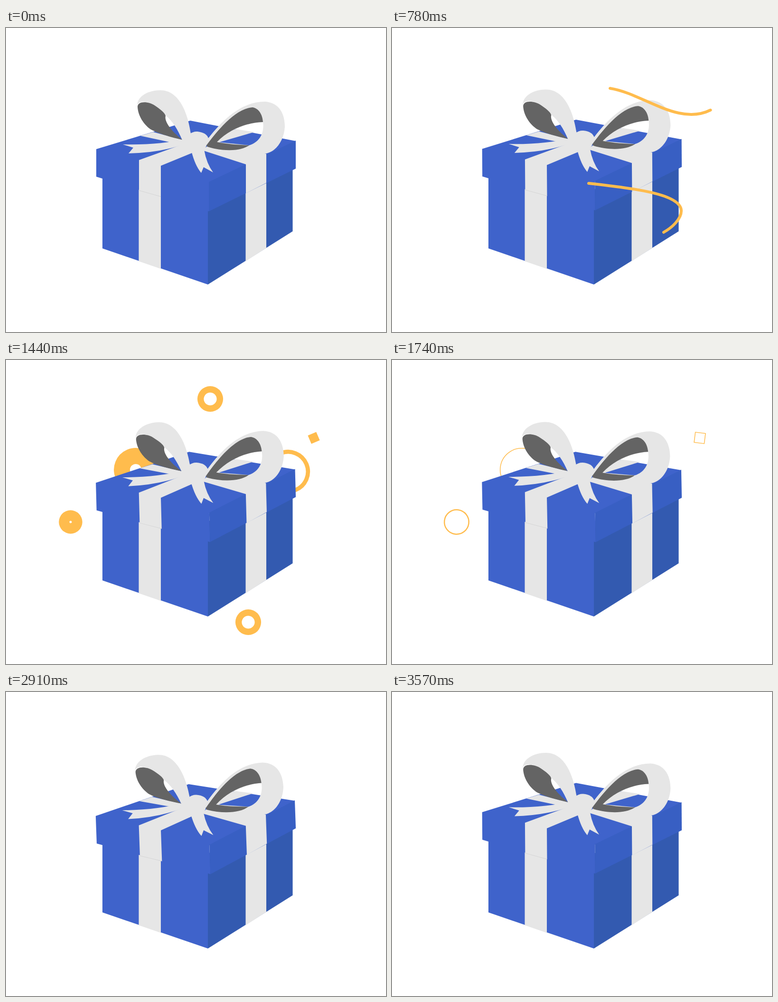
An HTML page that plays this animation: 800 px wide and 640 px high, repeating every 3600 ms.

```html
<!DOCTYPE html>
<html lang="en">
<head>
<meta charset="utf-8">
<title>Gift box</title>
<style>
  html, body { margin: 0; width: 100%; height: 100%; overflow: hidden; background: #fff; }
  svg { display: block; }
  .front { fill: #3f63cb; }
  .side { fill: #335ab0; }
  .lidSide { fill: #385fc3; }
  .ribbon { fill: #e6e6e6; }
  .inner { fill: #646464; }
  .streak, .burst { fill: none; stroke: #ffbc4d; }
  .streak { stroke-width: 6; stroke-linecap: round; }
</style>
</head>
<body>
<svg width="800" height="640" viewBox="0 0 800 640">
  <g id="behind"></g>

  <path class="front" d="M203 290L425 340V540L203 464Z"/>
  <path class="side" d="M425 340L603.5 260V428L425 540Z"/>
  <path class="ribbon" d="M279.5 300L326 310V507L279.5 491ZM504.5 310L548 290V463L504.5 491Z"/>

  <g id="lid">
    <path class="front" d="M190 255L388 195L610 238L427 325V386L190 313Z"/>
    <path class="lidSide" d="M427 324L610 237V296L427 386Z"/>
    <path class="ribbon" d="M280 278L380 242L404 258L326 290V355L280 342Z"/>
    <path class="ribbon" d="M548 265V326L505 348V287L412 257L440 238Z"/>
    <path class="ribbon" d="M283 227L310 219L400 243L376 247Z"/>
    <path class="ribbon" d="M485 213L523 219L440 243L425 232Z"/>
    <path d="M280 342L326 355" stroke="#d6d6d6"/>

    <path class="ribbon" d="M382 233Q320 247 246 245L268 252L258 264Q325 263 380 243Z"/>
    <path class="ribbon" d="M390 258Q398 290 411 305L416 293L436 304Q422 285 417 256Z"/>

    <path class="ribbon" d="M276 163C277 143 300 131 325 131C365 131 383 180 389 222L384 238L371 236C362 214 350 195 336 184C322 168 305 155 288 155C280 156 276 160 276 163Z"/>
    <path class="inner" d="M277 166C277 153 300 154 313 163C325 171 335 179 336 185C333 195 345 215 371 235C350 231 320 222 304 213C290 203 278 185 277 166Z"/>

    <path class="ribbon" fill-rule="evenodd" d="M420 240C460 186 500 155 545 155C575 157 587 180 587 208C585 240 565 265 540 265C500 266 460 262 424 250ZM444 240C475 212 510 199 541 198C544 220 535 240 512 247Z"/>
    <path class="inner" d="M422 247C437 227 480 169 519 167C532 169 540 182 541 198C505 199 470 214 444 240C470 245 490 246 512 247C495 259 460 261 424 250Z"/>
    <path class="ribbon" d="M375 240Q385 217 403 218Q422 220 426 232L421 250Q411 266 390 263Z"/>
  </g>

  <g id="ahead"></g>
</svg>
<script>
const LOOP = 3600;
const lid = document.getElementById('lid');

const clamp = v => Math.max(0, Math.min(1, v));
const ease = v => (1 - Math.cos(Math.PI * clamp(v))) / 2;
const out = v => Math.sin(Math.PI / 2 * clamp(v));

function add(layer, tag, attrs) {
  const el = document.createElementNS('http://www.w3.org/2000/svg', tag);
  for (const key in attrs) el.setAttribute(key, attrs[key]);
  return document.getElementById(layer).appendChild(el);
}

// Lid pose: time, vertical shift, angle in degrees
const poses = [
  [0, 0, 0], [280, -1, -.6], [555, -12, -.4], [780, -2, -.4],
  [1140, -2, -1.9], [1740, -2, -1.1], [2280, -2.5, -.95], [2500, -4, -.6],
  [2910, -1.5, -2.05], [3570, -3.5, -.4], [LOOP, -3.5, -.4]
];

function poseLid(t) {
  const i = poses.findIndex(p => p[0] > t);
  const [a, b] = [poses[i - 1], poses[i]];
  const k = ease((t - a[0]) / (b[0] - a[0]));
  const mix = n => a[n] + (b[n] - a[n]) * k;
  lid.setAttribute('transform', `translate(0 ${mix(1)}) rotate(${mix(2)} 400 290)`);
}

// Streaks draw themselves on, then are wiped from their start
const streaks = [
  ['M459 127C530 138 605 209 674 171', 570, 800, 800, 1215],
  ['M414 327C510 338 609 349 609 385C609 402 590 420 572 430', 570, 780, 790, 1120],
  ['M299 312C225 304 107 283 107 229C107 210 117 196 128 184', 830, 1080, 1140, 1440]
].map(([d, ...times]) => ({
  el: add('ahead', 'path', { class: 'streak', d, pathLength: 1 }), times
}));

function drawStreak({ el, times: [on, full, wipe, off] }, t) {
  const head = ease((t - on) / (full - on));
  const tail = ease((t - wipe) / (off - wipe));
  el.style.display = head > tail ? '' : 'none';
  el.setAttribute('stroke-dasharray', `${head - tail} 2`);
  el.setAttribute('stroke-dashoffset', -tail);
}

// Bursts swell as solid shapes, then hollow out to a thin outline
const bursts = [
  ['behind', 'circle', 594, 235, 46, 1020],
  ['behind', 'circle', 273, 231, 46, 1215],
  ['ahead', 'circle', 136, 341, 27, 1265],
  ['ahead', 'rect', 648, 164, 11.5, 1290],
  ['ahead', 'circle', 430, 82, 27, 1140],
  ['ahead', 'circle', 510, 552, 27, 1140]
].map(([layer, tag, x, y, size, start]) => ({
  el: add(layer, tag, { class: 'burst' }), tag, x, y, size, start
}));

function drawBurst({ el, tag, x, y, size, start }, t) {
  const p = (t - start) / 600;
  el.style.display = p > .01 && p < 1 ? '' : 'none';
  const outer = size * out(p / .4);
  const hole = Math.min(outer, size * out((p - .25) / .75));
  const r = (outer + hole) / 2;
  const set = (key, value) => el.setAttribute(key, value);
  set('stroke-width', outer - hole);
  set('transform', `translate(${x} ${y}) rotate(${7 + (t - 1740) * .1})`);
  if (tag === 'circle') return set('r', r);
  set('x', -r);
  set('y', -r);
  set('width', 2 * r);
  set('height', 2 * r);
}

function frame() {
  const t = performance.now() % LOOP;
  poseLid(t);
  streaks.forEach(s => drawStreak(s, t));
  bursts.forEach(b => drawBurst(b, t));
  requestAnimationFrame(frame);
}
frame();
</script>
</body>
</html>
```
